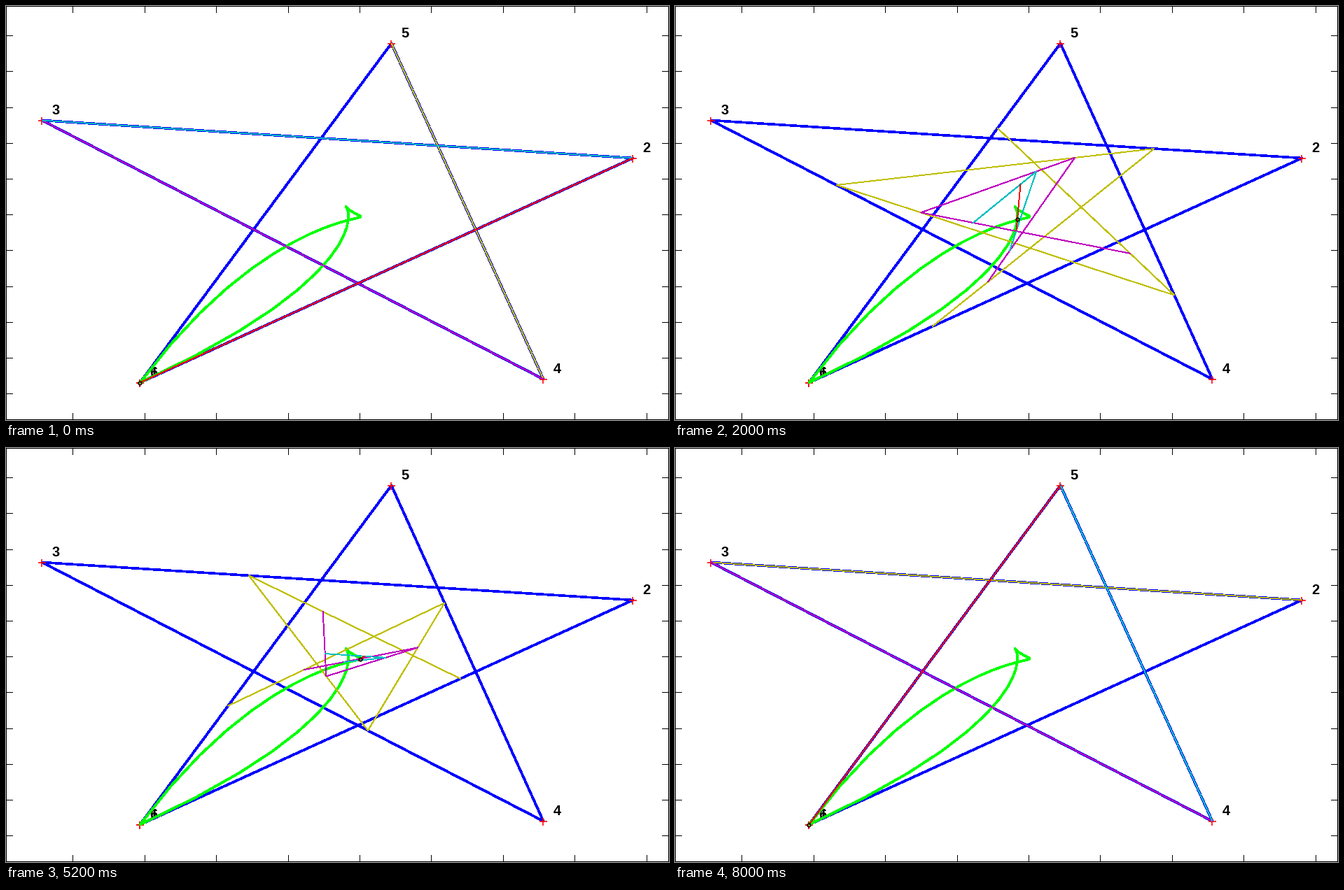
A matplotlib script that plays this animation: 947x592 px, repeating every 8200 ms.

```python
import numpy as np
import matplotlib.pyplot as plt
from matplotlib.animation import FuncAnimation
from matplotlib.patches import Rectangle

W, H, DPI = 947, 592, 64
STEPS = 40
PX = 72 / DPI  # one pixel in points
TICK = 10
THICK, THIN = 2.6, 0.9

CTRL = np.array([(191, 538), (895, 217), (51, 163),
                 (767, 533), (550, 53), (191, 538)]) + 0.5
LEVEL_COLORS = [(0.75, 0.75, 0), (0.75, 0, 0.75), (0, 0.75, 0.75), (1, 0, 0)]


def casteljau(t):
    """All levels of the construction, ending with the curve point."""
    levels, pts = [], CTRL
    while len(pts) > 1:
        pts = (1 - t) * pts[:-1] + t * pts[1:]
        levels.append(pts)
    return levels


fig = plt.figure(figsize=(W / DPI, H / DPI), dpi=DPI, facecolor="white")
ax = fig.add_axes([0, 0, 1, 1])
ax.set_xlim(0, W)
ax.set_ylim(H, 0)
ax.axis("off")


def line(pts, color, width, z, **kw):
    x, y = np.transpose(pts)
    return ax.plot(x, y, color=color, lw=width * PX, zorder=z,
                   antialiased=False, **kw)[0]


def bar(x, y, w, h):
    ax.add_patch(Rectangle((x, y), w, h, facecolor="black", linewidth=0,
                           antialiased=False, zorder=1))


def draw_frame():
    for y in (0, H - 1):
        bar(0, y, W, 1)
    for x in (0, W - 1):
        bar(x, 0, 1, H)
    for k in range(9):
        x = round(95.4 + 102.4 * k)
        bar(x, 0, 1, TICK)
        bar(x, H - TICK, 1, TICK)
    for k in range(11):
        y = round(42.1 + 51.22 * k)
        bar(0, y, TICK, 1)
        bar(W - TICK, y, TICK, 1)


draw_frame()
for i, (x, y) in enumerate(CTRL, 1):
    ax.text(x + 14, y - 8.5, str(i), family="Liberation Sans", weight="bold",
            size=20 * PX, ha="left", va="baseline", zorder=2)

line(CTRL, "blue", THICK, 3, solid_joinstyle="round", solid_capstyle="butt")
line(CTRL, "red", 0, 4, ls="none", marker="+", ms=11 * PX, mew=1.6 * PX)
curve = [casteljau(t)[-1][0] for t in np.linspace(0, 1, STEPS + 1)]
line(curve, "lime", THICK, 5, solid_joinstyle="round", solid_capstyle="round")

level_lines = [line(CTRL[:2], c, THIN, 6 + i, solid_capstyle="butt")
               for i, c in enumerate(LEVEL_COLORS)]
dot = line(CTRL[:1], "black", 0, 12, ls="none", marker="o", ms=4.8 * PX,
           mew=1.5 * PX, mfc="none")


def update(n):
    levels = casteljau(n / STEPS)
    for artist, pts in zip(level_lines + [dot], levels):
        artist.set_data(pts[:, 0], pts[:, 1])
    return level_lines + [dot]


anim = FuncAnimation(fig, update, frames=STEPS + 1, interval=200,
                     repeat=True, repeat_delay=0, blit=False)
plt.show()
```
